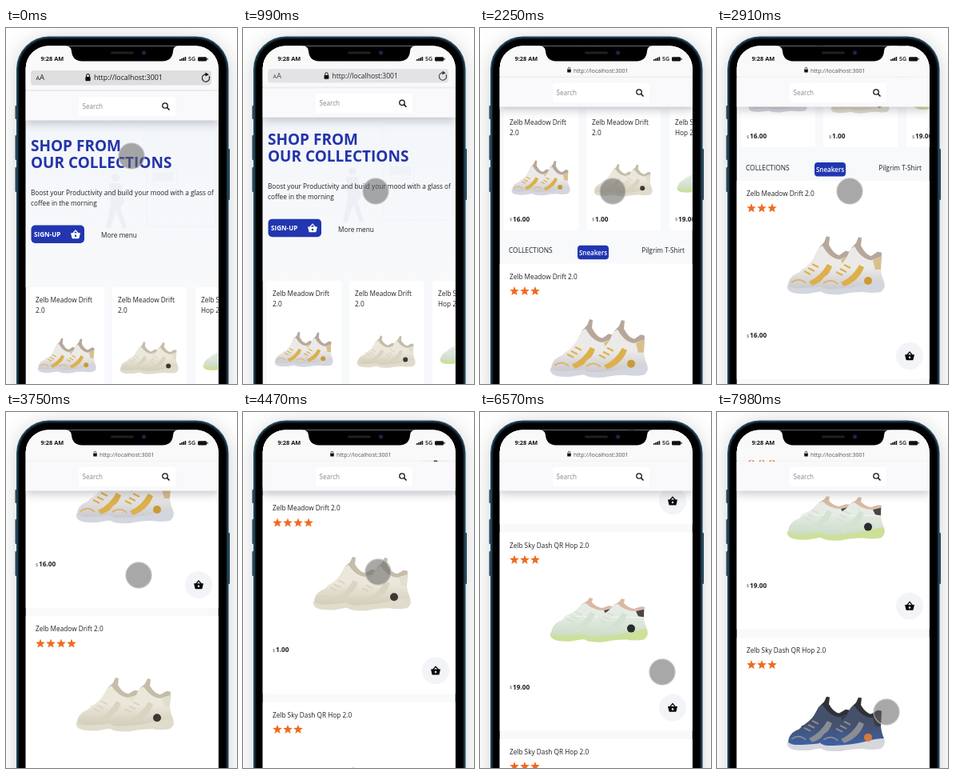
Write an HTML page with a canvas that moves like this. It is 289x445 px and loops after 8 s.

```html
<!DOCTYPE html>
<html lang="en">
<head>
<meta charset="utf-8">
<title>Shop on a phone</title>
<style>
  html, body { margin: 0; width: 100%; height: 100%; overflow: hidden; background: #fff; }
  canvas { display: block; width: 289px; height: 445px; }
</style>
</head>
<body>
<canvas id="stage"></canvas>
<script>
const W = 289, H = 445, LOOP = 8000;
const canvas = document.getElementById('stage');
const ctx = canvas.getContext('2d');
const ratio = window.devicePixelRatio || 1;
canvas.width = W * ratio;
canvas.height = H * ratio;

const BLUE = '#2136b0', INK = '#202124', PAGE = '#f8f9fb';

// time, value(s)
const SCROLL = [[0, 0], [840, 0], [1640, 84], [1710, 85], [2700, 326], [2910, 326], [3750, 520],
  [3990, 520], [4450, 671], [5520, 671], [5850, 759], [6540, 883], [7620, 883], [7980, 1010]];
const TOUCH = [[0, 157, 160], [30, 157, 160], [810, 166, 204], [3990, 166, 204], [4470, 169, 200],
  [4800, 169, 200], [5160, 241, 323], [5520, 241, 323], [5850, 241, 269], [6200, 241, 269],
  [6570, 228, 325], [7050, 241, 370], [7620, 241, 370], [7980, 212, 375]];

const SHOES = {
  gold: { upper: '#eceae8', shade: '#c9c8cd', accent: '#ddb04a', lining: '#b7a79a', heel: '#d9c08a',
    sole: '#d3d6de', mark: '#c99a35', rise: 1.08, lift: 0 },
  cream: { upper: '#ebe8db', shade: '#d2ccb8', accent: '#d9d3c1', lining: '#c3bda9', heel: '#e2dece',
    sole: '#e0dbcb', mark: '#3b3834', rise: 0.92, lift: -2 },
  mint: { upper: '#e6ece5', shade: '#ccdbc6', accent: '#d3e2d2', lining: '#d9b9a5', heel: '#4b4644',
    sole: '#cde09a', mark: '#2a2b30', rise: 0.58, lift: 5 },
  navy: { upper: '#45506a', shade: '#3c62a8', accent: '#8b8d95', lining: '#2f3038', heel: '#3a3c46',
    sole: '#d5d7dd', mark: '#d8793c', rise: 0.95, lift: 0 }
};
const LIGHT = 'Zelb Meadow Drift 2.0', FAST = 'Zelb Sky Dash QR Hop 2.0';
const PRODUCTS = [
  { name: LIGHT, stars: 3, price: '16.00', shoe: SHOES.gold },
  { name: LIGHT, stars: 4, price: '1.00', shoe: SHOES.cream },
  { name: FAST, stars: 3, price: '19.00', shoe: SHOES.mint },
  { name: FAST, stars: 3, price: '19.00', shoe: SHOES.navy }
];
const CARDS = [
  { x: 30, lines: ['Zelb Meadow Drift', '2.0'], item: PRODUCTS[0] },
  { x: 133, lines: ['Zelb Meadow Drift', '2.0'], item: PRODUCTS[1] },
  { x: 237, lines: ['Zelb Sky Dash QR', 'Hop 2.0'], item: PRODUCTS[2] }
];

const clamp = v => Math.max(0, Math.min(1, v));
const mix = (a, b, p) => a + (b - a) * p;

function sample(keys, t) {
  let i = 0;
  while (i < keys.length - 2 && t >= keys[i + 1][0]) i++;
  const a = keys[i], b = keys[i + 1];
  const p = clamp((t - a[0]) / (b[0] - a[0]));
  const e = p * p * (3 - 2 * p);
  return a.slice(1).map((v, n) => mix(v, b[n + 1], e));
}

function text(s, x, y, size = 8.25, color = INK, weight = 400, align = 'left') {
  ctx.font = `${weight} ${size}px "Open Sans", "Noto Sans", sans-serif`;
  ctx.textAlign = align;
  ctx.fillStyle = color;
  ctx.fillText(s, x, y + size * 0.357);
}

function box(x, y, w, h, r, color) {
  ctx.beginPath();
  ctx.roundRect(x, y, w, h, r);
  ctx.fillStyle = color;
  ctx.fill();
}

function disc(x, y, r, color) {
  ctx.beginPath();
  ctx.arc(x, y, r, 0, Math.PI * 2);
  ctx.fillStyle = color;
  ctx.fill();
}

function at(x, y, scale, draw) {
  ctx.save();
  ctx.translate(x, y);
  ctx.scale(scale, scale);
  draw();
  ctx.restore();
}

function fillPath(d, color) {
  ctx.fillStyle = color;
  ctx.fill(new Path2D(d));
}

function strokePath(d, color, width) {
  ctx.strokeStyle = color;
  ctx.lineWidth = width;
  ctx.stroke(new Path2D(d));
}

function basket(x, y, color, hole) {
  at(x, y, 1, () => {
    strokePath('M-3.5 -1L0 -5L3.5 -1', color, 1.3);
    fillPath('M-6 -1.7H6L4.5 4.6Q4.3 5.2 3.6 5.2H-3.6Q-4.3 5.2 -4.5 4.6Z', color);
    disc(0, 1.8, 1.25, hole);
  });
}

function star(x, y) {
  ctx.beginPath();
  for (let i = 0; i < 10; i++) {
    const a = -Math.PI / 2 + i * Math.PI / 5, r = i % 2 ? 2.6 : 6.2;
    ctx.lineTo(x + r * Math.cos(a), y + r * Math.sin(a));
  }
  ctx.fillStyle = '#ee6b20';
  ctx.fill();
}

function oneShoe(c) {
  const skin = ctx.createLinearGradient(0, -22, 0, 28);
  skin.addColorStop(0, c.upper);
  skin.addColorStop(0.45, c.upper);
  skin.addColorStop(1, c.shade);
  ctx.save();
  ctx.scale(1, c.rise);
  fillPath('M15 -11L21 -22L27 -28L30 -35L34 -34L33 -25Q39 -14 46 -13L54 -18L59 -17L58 3H8Z', c.lining);
  fillPath('M-1 4Q9 -2 15 -11L20 -21L25 -24Q34 -9 46 -8L58 -12Q57 -3 58 4Z', skin);
  fillPath('M48 -8L58 -12L58 5L51 3Z', c.heel);
  ctx.restore();
  fillPath('M-18 25Q-18 14 -8 9Q-2 7 -1 3H58Q59 12 62 18L60 28L-16 30Z', skin);
  fillPath('M8 19Q23 12 31 -3L37 0Q31 17 12 24Z', c.accent);
  strokePath('M2 6L10 10M7 2L15 6M12 -3L20 1', c.accent, 2);
  strokePath('M-14 20Q-4 13 4 21', c.accent, 1.6);
  fillPath('M-19 23Q-14 28 0 27Q24 26 38 22Q52 18 62 18Q65 26 58 31Q46 33 36 31Q20 31 8 34Q-10 35 -16 31Q-20 28 -19 23Z', c.sole);
}

function shoePair(x, y, scale, c) {
  at(x, y - c.lift * scale, scale, () => {
    ctx.save();
    ctx.translate(-40, -1);
    oneShoe(c);
    ctx.restore();
    oneShoe(c);
    disc(42, 17, 5, c.mark);
  });
}

function price(value, x, y) {
  text('$', x, y + 0.6, 6, '#555');
  text(value, x + 4, y, 8.25, INK, 700);
}

function hero(scroll) {
  const g = ctx.createLinearGradient(0, 110, 0, 320);
  g.addColorStop(0, '#f3f6fa');
  g.addColorStop(1, PAGE);
  ctx.fillStyle = g;
  ctx.fillRect(24, 0, 243, 324);

  // faint backdrop illustration
  strokePath('M176 127H262V248H176ZM184 176H214V196H184Z', '#eef3f8', 1);
  ctx.fillStyle = '#eff3f8';
  ctx.fillRect(184, 180, 26, 12);
  disc(137, 187, 5, '#eceff4');
  fillPath('M129 194H144L148 218 143 224 151 249 146 251 138 229 130 251 125 249 131 219Z', '#eceff4');

  // the heading disappears for good once it is behind the search bar
  if (scroll < 77) {
    text('SHOP FROM', 31, 147, 19, '#2334a8', 700);
    text('OUR COLLECTIONS', 31, 168, 19, '#2334a8', 700);
  }
  text('Boost your Productivity and build your mood with a glass of', 31, 206.4);
  text('coffee in the morning', 31, 219);
  box(31.5, 246.5, 66.5, 22.5, 5, BLUE);
  text('SIGN-UP', 35, 258, 8.1, '#fff', 700);
  basket(87, 258, '#fff', BLUE);
  text('More menu', 119, 259.5);
}

function cards() {
  for (const { x, lines, item } of CARDS) {
    box(x, 324, 93, 151, 2, '#fff');
    lines.forEach((s, i) => text(s, x + 7, 340 + i * 13));
    shoePair(x + 45, 411, 0.6, item.shoe);
    price(item.price, x + 7, 461);
  }
}

function categories() {
  text('COLLECTIONS', 36, 500.7, 8.4);
  box(122, 494, 39, 17.5, 4, BLUE);
  text('Sneakers', 141.5, 503, 8, '#fff', 600, 'center');
  text('Pilgrim T-Shirt', 256, 500.7, 8.25, INK, 400, 'right');
}

function products() {
  PRODUCTS.forEach((p, i) => {
    const y = 533 + i * 258.3;
    box(24, y - 16, 243, 248, 0, '#fff');
    text(p.name, 37, y);
    for (let n = 0; n < p.stars; n++) star(43 + n * 13, y + 18.3);
    shoePair(147, y + 92, 1, p.shoe);
    price(p.price, 37, y + 177);
    disc(241, y + 203, 17, '#f3f4f7');
    basket(241, y + 203, '#0a0a0a', '#f3f4f7');
  });
}

function lock(x, y, scale, color) {
  at(x, y, scale, () => {
    box(-3, -1, 6, 5, 0.8, color);
    strokePath('M-1.8 -1V-2.4A1.8 1.8 0 0 1 1.8 -2.4V-1', color, 1);
  });
}

function navBar(y) {
  ctx.save();
  ctx.shadowColor = 'rgba(60,65,80,.28)';
  ctx.shadowBlur = 12 * ratio;
  ctx.shadowOffsetY = 4 * ratio;
  box(24, y, 243, 36.5, 0, '#f9f9fb');
  ctx.restore();
  box(91, y + 7, 121, 24, 2, '#fff');
  text('Search', 95.5, y + 19.3, 8.1, '#85888f');
  ctx.beginPath();
  ctx.arc(199, y + 18, 3.2, 0, Math.PI * 2);
  ctx.strokeStyle = '#111';
  ctx.lineWidth = 1.3;
  ctx.stroke();
  strokePath(`M201.3 ${y + 20.3}L204.5 ${y + 23.5}`, '#111', 1.6);
}

function addressBar(fold) {
  box(24, 20, 243, mix(57, 40.5, fold), 0, '#f9f9fa');
  ctx.save();
  ctx.globalAlpha = 1 - fold;
  box(31, mix(53, 45, fold), 226, mix(18.5, 13, fold), 4, '#dedee0');
  const y = mix(62, 53, fold);
  text('A', 37.5, y + 0.8, 7, '#222');
  text('A', 42, y, 9.5, '#222');
  ctx.beginPath();
  ctx.arc(250, y + 0.5, 4.6, -0.5, Math.PI * 1.55);
  ctx.strokeStyle = '#111';
  ctx.lineWidth = 1.2;
  ctx.stroke();
  fillPath(`M249.5 ${y - 6.5}L253.8 ${y - 3.8}L249.5 ${y - 1.5}Z`, '#111');
  ctx.restore();
  const shade = Math.round(mix(25, 85, fold));
  lock(mix(102.5, 111.5, fold), mix(62, 52.5, fold), mix(1.05, 0.75, fold), '#111');
  text('http://localhost:3001', mix(110, 117, fold), mix(62.3, 53, fold), mix(8.9, 7.1, fold),
    `rgb(${shade},${shade},${shade})`);
}

function statusBar() {
  text('9:28 AM', 43.5, 38, 7.4, '#111', 700);
  for (let i = 0; i < 4; i++) box(217 + i * 2.2, 39 - i, 1.6, 2 + i, 0.3, '#111');
  text('5G', 228, 38.8, 7, '#111', 600);
  box(240, 36.2, 11, 5.4, 1.4, '#111');
  box(251.5, 37.8, 1, 2.2, 0.4, '#111');
}

function phoneBody() {
  ctx.save();
  ctx.shadowColor = 'rgba(70,75,85,.3)';
  ctx.shadowBlur = 26 * ratio;
  box(15, 15, 262, 480, 40, '#000');
  ctx.restore();
  box(11.5, 97, 3, 17, 1, '#2b4656');
  box(11.5, 134, 3, 31, 1, '#2b4656');
  box(11.5, 174, 3, 31, 1, '#2b4656');
  box(277, 151, 3, 64, 1, '#2b4656');
  box(13, 10.5, 265.5, 480, 41, '#24485c');
  box(14.8, 12.3, 261.9, 480, 39, '#0c1c27');
  box(16.3, 13.8, 258.9, 480, 38, '#000');
}

function notch() {
  fillPath('M74 22H216Q209 23 209 29Q208 41 196 41.5H95Q83 41 82 29Q82 23 74 22Z', '#000');
  box(131, 29.5, 29, 3, 1.5, '#1d2024');
  disc(172.5, 31, 3, '#10172b');
  disc(172.5, 31, 1.3, '#26376b');
}

function touch(t) {
  const [x, y] = sample(TOUCH, t);
  const tap = start => Math.sin(Math.PI * clamp((t - start) / 150));
  const press = tap(5130) + tap(7245);
  const r = 16 - press * 2;
  disc(x, y, r, `rgba(100,100,100,${0.56 + press * 0.15})`);
  ctx.beginPath();
  ctx.arc(x, y, r, 0, Math.PI * 2);
  ctx.strokeStyle = 'rgba(190,190,190,.75)';
  ctx.lineWidth = 1.4;
  ctx.stroke();
}

function draw(t) {
  const [scroll] = sample(SCROLL, t);
  const fold = clamp(scroll / 36);
  ctx.setTransform(ratio, 0, 0, ratio, 0, 0);
  ctx.fillStyle = '#fff';
  ctx.fillRect(0, 0, W, H);
  phoneBody();

  ctx.save();
  ctx.beginPath();
  ctx.roundRect(24.7, 22.5, 241, 480, 28);
  ctx.clip();
  ctx.fillStyle = PAGE;
  ctx.fillRect(24, 20, 243, 430);
  ctx.save();
  ctx.translate(0, -scroll);
  hero(scroll);
  cards();
  categories();
  products();
  ctx.restore();
  navBar(mix(79, 62, fold));
  addressBar(fold);
  statusBar();
  notch();
  ctx.restore();

  touch(t);
}

function frame(now) {
  draw(now % LOOP);
  requestAnimationFrame(frame);
}
draw(0);
requestAnimationFrame(frame);
</script>
</body>
</html>
```
